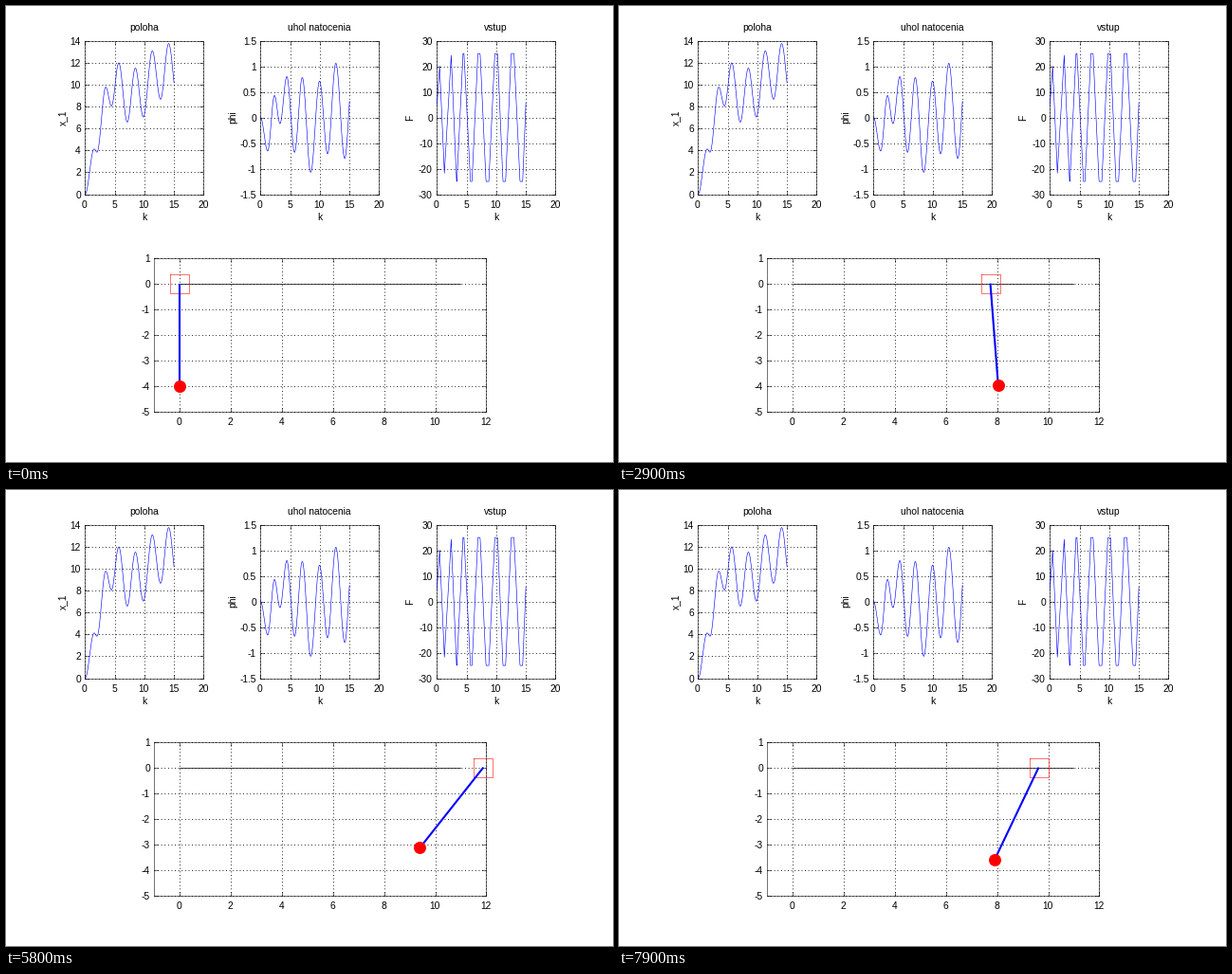
Animation, 640 px wide and 481 px high, one loop 8 s. Source, as a matplotlib script:

```python
import numpy as np
import matplotlib
import matplotlib.pyplot as plt
from matplotlib.animation import FuncAnimation

matplotlib.rcParams["font.family"] = "Liberation Sans"

W, H, DPI = 640, 481, 64
PX = 72 / DPI          # points per pixel
STEP = 100             # ms per frame
FRAMES = 80
ROD = 4.0
THIN = 0.55

# turning points of the two oscillations: (time, value)
CART = [(0, 0), (1.52, 4.13), (2.01, 3.84), (3.49, 9.77), (4.45, 8.05),
        (5.68, 11.98), (7.11, 6.58), (8.48, 11.5), (9.82, 7.04),
        (11.34, 13.07), (12.72, 8.66), (14.1, 13.74), (15.5, 8.74)]
ANGLE = [(0, 0), (1.2, -0.655), (2.35, 0.43), (3.28, -0.12), (4.43, 0.8),
         (5.73, -0.68), (7.04, 0.78), (8.46, -1.07), (9.95, 0.71),
         (11.3, -0.71), (12.7, 1.06), (14.2, -0.8), (15.5, 0.85)]


def swing(turns, t):
    """Half a cosine wave between each pair of turning points."""
    times, values = np.transpose(turns)
    i = np.clip(np.searchsorted(times, t, side="right") - 1, 0, len(times) - 2)
    u = (t - times[i]) / (times[i + 1] - times[i])
    return values[i] + (values[i + 1] - values[i]) * (1 - np.cos(np.pi * u)) / 2


def force(t):
    """Growing triangle wave in step with the angle, limited to 25."""
    turns = np.array([0.45] + [at + 0.05 for at, _ in ANGLE[1:]])
    peaks = np.minimum(37, 19 + 2.2 * turns) * (-1.0) ** np.arange(len(turns))
    wave = np.interp(t, np.append(0, turns), np.append(5, peaks))
    return np.clip(wave, -25, 25)


fig = plt.figure(figsize=(W / DPI, H / DPI), dpi=DPI, facecolor="white")
stage = fig.add_axes([0, 0, 1, 1])
stage.set_xlim(0, W)
stage.set_ylim(H, 0)
stage.axis("off")


def line(xs, ys, width=THIN, color="black", **kw):
    return stage.plot(xs, ys, color=color, lw=width * PX, **kw)[0]


def text(x, y, s, ha="center", va="baseline", **kw):
    stage.text(x - 0.5, y, s, ha=ha, va=va, fontsize=10.2 * PX, **kw)


class Panel:
    def __init__(self, left, top, width, xlim, ylim, xticks, yticks):
        # just off the pixel centre, so that snapping rounds to it
        x0, y0 = left + 0.4, top + 0.6
        x1, y1 = x0 + width, y0 + 162
        self.box, self.xlim, self.ylim = (x0, y0, x1, y1), xlim, ylim
        dots = dict(dashes=(1, 3), dash_capstyle="butt")
        for v in xticks:
            x = self.x(v)
            line([x, x], [y1, y0], 0.9, **dots)
            line([x, x], [y1, y1 - 4])
            line([x, x], [y0, y0 + 4])
            text(x, y1 + 14.5, f"{v:g}")
        for v in yticks:
            y = self.y(v)
            line([x0, x1], [y, y], 0.9, **dots)
            line([x0, x0 + 4], [y, y])
            line([x1, x1 - 4], [y, y])
            text(x0 - 4, y + 4, f"{v:g}", ha="right")
        line([x0, x1, x1, x0, x0], [y0, y0, y1, y1, y0],
             solid_joinstyle="miter")

    def x(self, v):
        a, b = self.xlim
        return self.box[0] + (v - a) / (b - a) * (self.box[2] - self.box[0])

    def y(self, v):
        a, b = self.ylim
        return self.box[3] - (v - a) / (b - a) * (self.box[3] - self.box[1])


def chart(left, low, high, step, title, label, label_x, values):
    p = Panel(left, 36, 125, (0, 20), (low, high),
              range(0, 21, 5), np.arange(low, high + step / 2, step))
    mid = p.x(10)
    text(mid, 26, title)
    text(mid, 226, "k")
    text(label_x, 117.5, label, rotation=90, va="center")
    line(p.x(t), p.y(values), 0.6, "blue")


t = np.linspace(0, 15, 301)
chart(83, 0, 14, 2, "poloha", "x_1", 60.5, swing(CART, t))
chart(268, -1.5, 1.5, 0.5, "uhol natocenia", "phi", 240, swing(ANGLE, t))
chart(454, -30, 30, 10, "vstup", "F", 427, force(t))

scene = Panel(156, 265, 350, (-1, 12), (-5, 1), range(0, 13, 2), range(-5, 2))
line([scene.x(0), scene.x(11)], [scene.y(0)] * 2, 0.7)

cart = line([], [], THIN, "red", solid_joinstyle="miter", zorder=3)
rod = line([], [], 2.1, "blue", solid_capstyle="butt", zorder=4)
ball = line([], [], 0, "red", marker="o", ms=13 * PX, mew=0, zorder=5)
CORNERS = 10 * np.array([(-1, -1), (1, -1), (1, 1), (-1, 1), (-1, -1)])


def draw(i):
    now = i * STEP / 1000
    pos, phi = swing(CART, now), swing(ANGLE, now)
    x, y = scene.x(pos), scene.y(0)
    bx = scene.x(pos + ROD * np.sin(phi))
    by = scene.y(-ROD * np.cos(phi))
    cart.set_data(x + CORNERS[:, 0], y + CORNERS[:, 1])
    rod.set_data([x, bx], [y, by])
    ball.set_data([bx], [by])
    return cart, rod, ball


anim = FuncAnimation(fig, draw, frames=FRAMES, interval=STEP, repeat=True,
                     repeat_delay=0)
plt.show()
```
